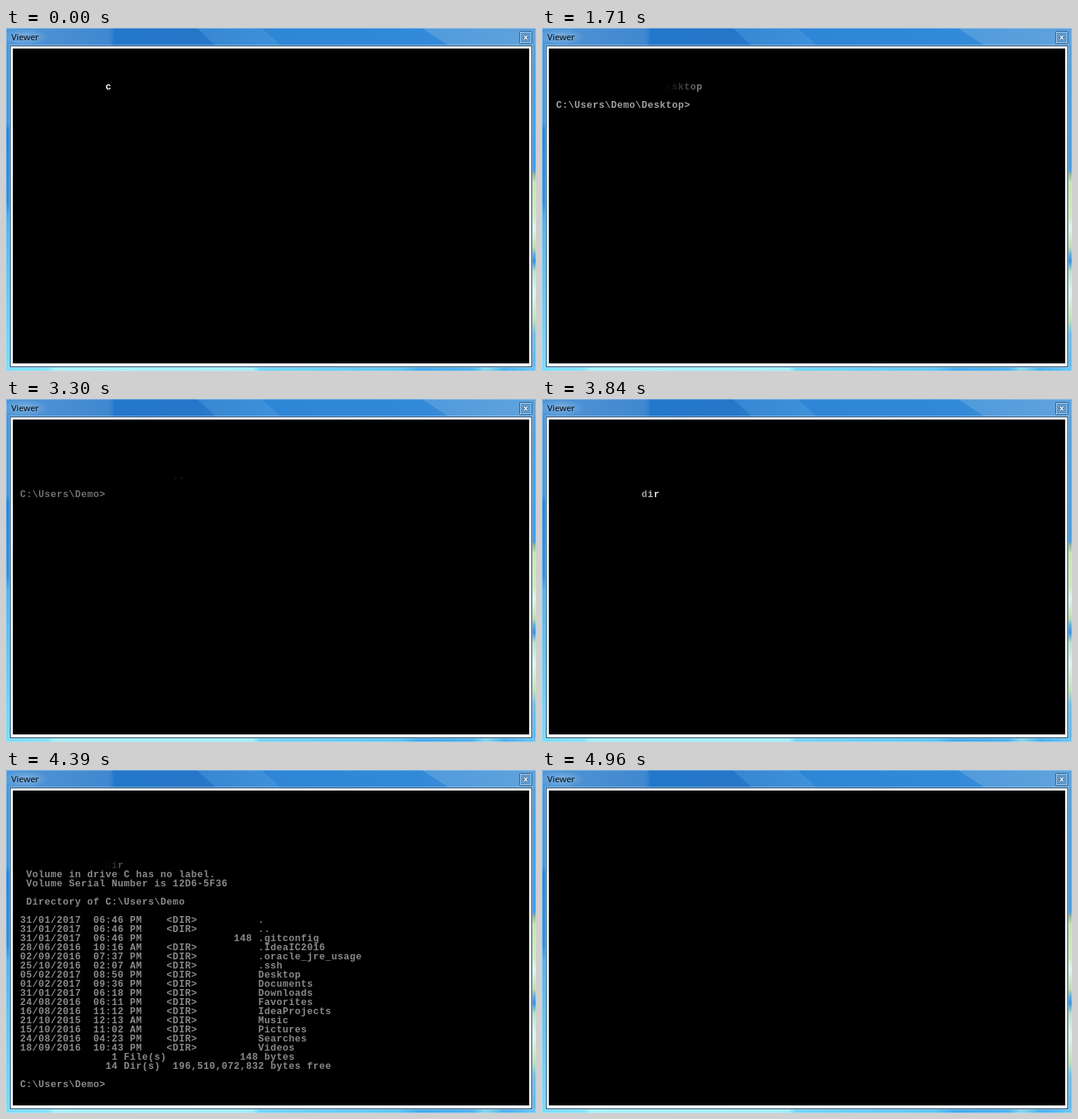
Recreate the animation shown at these times as an HTML page. Size 695 by 451 pixels, loop 5690 ms.

```html
<!DOCTYPE html>
<html lang="en">
<head>
<meta charset="utf-8">
<title>Viewer</title>
<style>
html, body { margin: 0; width: 100%; height: 100%; overflow: hidden; background: #000; }
#stage { position: absolute; left: 0; top: 0; width: 695px; height: 451px; overflow: hidden; }
svg { position: absolute; left: 0; top: 0; display: block; }
.ink {
  position: absolute; margin: 0; white-space: pre; color: #000;
  font: bold 12.5px/12px "Liberation Mono", "DejaVu Sans Mono", monospace;
  letter-spacing: .5px;
  font-variant-ligatures: none;
}
</style>
</head>
<body>
<div id="stage">
<svg width="695" height="451" viewBox="0 0 695 451">
  <defs>
    <linearGradient id="top">
      <stop offset="0" stop-color="#4f97d8"/>
      <stop offset=".1" stop-color="#4a8ed2"/>
      <stop offset=".195" stop-color="#3f88d0"/>
      <stop offset=".205" stop-color="#2377cb"/>
      <stop offset=".36" stop-color="#2576c8"/>
      <stop offset=".5" stop-color="#2f86d6"/>
      <stop offset=".78" stop-color="#3289d8"/>
      <stop offset="1" stop-color="#4b97d9"/>
    </linearGradient>
    <linearGradient id="left" gradientUnits="userSpaceOnUse" x1="0" y1="0" x2="0" y2="451">
      <stop offset="0" stop-color="#4a94d6"/>
      <stop offset=".28" stop-color="#3f97de"/>
      <stop offset=".3" stop-color="#2384dc"/>
      <stop offset=".51" stop-color="#2f8ee0"/>
      <stop offset=".56" stop-color="#4fb2ee"/>
      <stop offset="1" stop-color="#78dcf8"/>
    </linearGradient>
    <linearGradient id="right" gradientUnits="userSpaceOnUse" x1="0" y1="0" x2="0" y2="451">
      <stop offset="0" stop-color="#559fdb"/>
      <stop offset=".2" stop-color="#429fe6"/>
      <stop offset=".415" stop-color="#3c9ce8"/>
      <stop offset=".425" stop-color="#8fb193"/>
      <stop offset=".45" stop-color="#c4e6ac"/>
      <stop offset=".55" stop-color="#cdebb8"/>
      <stop offset=".58" stop-color="#e2f6f0"/>
      <stop offset=".64" stop-color="#bfdca4"/>
      <stop offset=".66" stop-color="#58aee0"/>
      <stop offset=".68" stop-color="#2f8fe4"/>
      <stop offset=".71" stop-color="#b8e2c4"/>
      <stop offset=".77" stop-color="#e0f5ee"/>
      <stop offset=".85" stop-color="#bfe2b0"/>
      <stop offset=".89" stop-color="#6cc0ea"/>
      <stop offset="1" stop-color="#54b8f2"/>
    </linearGradient>
    <linearGradient id="base">
      <stop offset="0" stop-color="#74dcf8"/>
      <stop offset=".08" stop-color="#80e2f8"/>
      <stop offset=".09" stop-color="#a4f0fb"/>
      <stop offset=".465" stop-color="#a0eefb"/>
      <stop offset=".48" stop-color="#6cd4f6"/>
      <stop offset=".74" stop-color="#5ac4f4"/>
      <stop offset=".78" stop-color="#3fa8ec"/>
      <stop offset=".88" stop-color="#48b0ee"/>
      <stop offset=".905" stop-color="#86d8ea"/>
      <stop offset=".94" stop-color="#46aeee"/>
      <stop offset="1" stop-color="#64c6f6"/>
    </linearGradient>
    <radialGradient id="glow">
      <stop offset="0" stop-color="#fff" stop-opacity=".3"/>
      <stop offset="1" stop-color="#fff" stop-opacity="0"/>
    </radialGradient>
  </defs>
  <rect width="695" height="24" fill="url(#top)"/>
  <path d="M250 0H335L362 24H276Z" fill="#5aa4e2" opacity=".35"/>
  <path d="M545 0H695V24H582Z" fill="#7db4e0" opacity=".4"/>
  <rect y="23" width="6" height="428" fill="url(#left)"/>
  <rect x="689" y="23" width="6" height="428" fill="url(#right)"/>
  <rect y="445" width="695" height="6" fill="url(#base)"/>
  <rect x=".5" y=".5" width="694" height="450" fill="none" stroke="#d4ecfa" stroke-opacity=".4"/>
  <rect x="4.5" y="22.5" width="686" height="424" fill="none" stroke="#e4f4fc" stroke-opacity=".45"/>
  <rect x="5.5" y="23.5" width="684" height="422" fill="#f2f8fc" stroke="#1f4468"/>
  <rect x="9" y="27" width="677" height="414"/>
  <ellipse cx="25" cy="12" rx="30" ry="11" fill="url(#glow)"/>
  <text x="7" y="16" font-family="'Open Sans', 'Noto Sans', sans-serif" font-size="11.5">Viewer</text>
  <rect x="673.5" y="4.5" width="16" height="16" rx="1" fill="#5c9bd0" stroke="#2c5c8c"/>
  <rect x="674.5" y="5.5" width="14" height="14" fill="none" stroke="#b9d9f0" stroke-opacity=".8"/>
  <path d="M679.5 10L683.5 15M683.5 10L679.5 15" stroke="#24507c" stroke-width="3"/>
  <path d="M679.5 10L683.5 15M683.5 10L679.5 15" stroke="#fff" stroke-width="1.5"/>
</svg>
</div>
<script>
const LOOP = 5690;
// The picture only changes at these moments.
const TICKS = [
  0, 70, 170, 280, 390, 490, 600, 710, 810, 920, 1070,
  1240, 1390, 1550, 1710, 1860, 2000, 2130, 2270,
  2340, 2500, 2660, 2820, 2980, 3140, 3300,
  3440, 3580, 3720, 3830, 3940, 4070, 4230, 4390,
  4560, 4630, 4810, 4960
];
const HOME = "C:\\Users\\Demo";
const ENTRIES = `31/01/2017  06:46 PM .
31/01/2017  06:46 PM ..
31/01/2017  06:46 PM .gitconfig
28/06/2016  10:16 AM .IdeaIC2016
02/09/2016  07:37 PM .oracle_jre_usage
25/10/2016  02:07 AM .ssh
05/02/2017  08:50 PM Desktop
01/02/2017  09:36 PM Documents
31/01/2017  06:18 PM Downloads
24/08/2016  06:11 PM Favorites
16/08/2016  11:12 PM IdeaProjects
21/10/2015  12:13 AM Music
15/10/2016  11:02 AM Pictures
24/08/2016  04:23 PM Searches
18/09/2016  10:43 PM Videos`.split("\n");

const stage = document.getElementById("stage");
const inks = [];

// Ink appears white at `born` and fades to black over `life` ms.
function addInk(text, col, row, born, life) {
  const el = document.createElement("pre");
  el.className = "ink";
  el.textContent = text;
  el.style.left = 18.6 + col * 8 + "px";
  el.style.top = 72 + row * 12 + "px";
  stage.append(el);
  inks.push({ el, born, life });
}

function typeKeys(text, col, row, times, life) {
  [...text].forEach((key, i) => addInk(key, col + i, row, times[i], life));
}

function entryLine(entry) {
  const stamp = entry.slice(0, 20);
  const name = entry.slice(21);
  const size = name === ".gitconfig" ? "148".padStart(18) : "    <DIR>".padEnd(18);
  return stamp + size + " " + name;
}

const listing = [
  " Volume in drive C has no label.",
  " Volume Serial Number is 12D6-5F36",
  "",
  " Directory of " + HOME,
  "",
  ...ENTRIES.map(entryLine),
  "1 File(s)".padStart(24) + "148 bytes".padStart(21),
  "14 Dir(s)".padStart(23) + "  196,510,072,832 bytes free",
  "",
  HOME + ">"
];

typeKeys("cd Desktop", 14, 0, [0, 170, 280, 390, 490, 600, 710, 810, 920, 1070], 1270);
addInk(HOME + "\\Desktop>", 0, 2, 1240, 1270);
typeKeys("cd ..", 22, 2, [1860, 2000, 2130, 2270, 2340], 1130);
addInk(HOME + ">", 0, 4, 2660, 1130);
typeKeys("dir", 14, 4, [3440, 3580, 3720], 980);
listing.forEach((line, i) => addInk(line, 0, 5 + i, 3940, 980));

function draw(now) {
  const time = now % LOOP;
  const tick = TICKS.findLast(t => t <= time);
  for (const { el, born, life } of inks) {
    const age = tick - born;
    const level = age < 0 ? 0 : Math.max(0, Math.round(255 * (1 - age / life)));
    el.style.color = `rgb(${level},${level},${level})`;
    el.style.visibility = level ? "visible" : "hidden";
  }
}

const start = performance.now();
function loop() {
  draw(performance.now() - start);
  requestAnimationFrame(loop);
}
loop();
</script>
</body>
</html>
```
